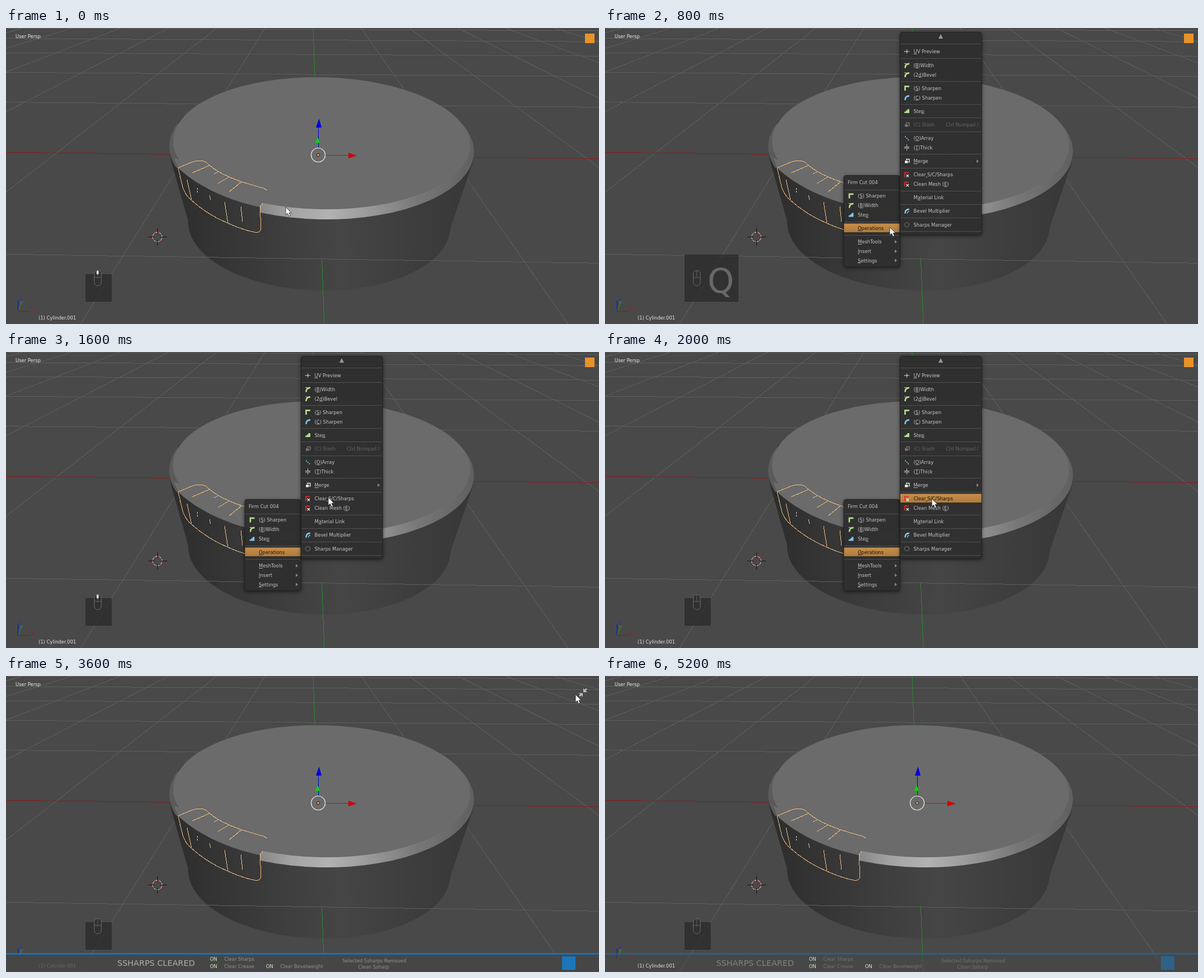
These frames come from a looping animation (1058 px wide and 529 px high, 5400 ms). An HTML page:

```html
<!DOCTYPE html>
<html lang="en">
<head>
<meta charset="utf-8">
<title>Clearing sharps on a cylinder</title>
<style>
html, body { margin: 0; width: 100%; height: 100%; overflow: hidden; background: #494949; }
svg { display: block; width: 1058px; height: 529px; }
text { font: 8.4px "DejaVu Sans", sans-serif; fill: #c6c6c6; white-space: pre; }
.u { text-decoration: underline; }
.dim { fill: #656565; }
.on { fill: #111; }
.sep { stroke: #505050; }
.menu { filter: drop-shadow(0 2px 3px rgba(0,0,0,.55)); }
.frame { fill: #303030; fill-opacity: .97; stroke: #222; }
.grid { stroke: #5e5e5e; shape-rendering: crispEdges; }
.orange { fill: none; stroke: #f3bc7d; shape-rendering: crispEdges; }
.foot text { fill: #929292; }
</style>
</head>
<body>
<svg viewBox="0 0 1058 529" xmlns="http://www.w3.org/2000/svg">
  <defs>
    <linearGradient id="side">
      <stop offset="0" stop-color="#2c2c2c"/><stop offset=".18" stop-color="#353535"/>
      <stop offset=".4" stop-color="#3f3f3f"/><stop offset=".56" stop-color="#454545"/>
      <stop offset=".78" stop-color="#3e3e3e"/><stop offset="1" stop-color="#373737"/>
    </linearGradient>
    <linearGradient id="ring" gradientUnits="userSpaceOnUse" x1="291" x2="835">
      <stop offset="0" stop-color="#5c5c5c"/><stop offset=".05" stop-color="#565656"/>
      <stop offset=".3" stop-color="#868686"/><stop offset=".4" stop-color="#a2a2a2"/>
      <stop offset=".53" stop-color="#b2b2b2"/><stop offset=".68" stop-color="#969696"/>
      <stop offset=".82" stop-color="#777"/><stop offset="1" stop-color="#606060"/>
    </linearGradient>
    <linearGradient id="glow" x2="0" y2="1">
      <stop offset="0" stop-color="#c68f4c"/><stop offset="1" stop-color="#b17a39"/>
    </linearGradient>
    <clipPath id="uncut"><path d="M280,80H307V250H280Z M453,80H850V360H453Z"/></clipPath>
  </defs>

  <rect width="1058" height="529" fill="#494949"/>
  <g id="far" class="grid"></g>

  <!-- cylinder -->
  <path fill="url(#side)" d="M291,211 Q293,236 298,250 L325,345 A234,118 1.4 0 0 793,357 L830,249 Q835,236 835,222 Z"/>
  <g transform="rotate(1.2 563 216)">
    <ellipse cx="563" cy="216" rx="272" ry="126" fill="url(#side)"/>
  </g>
  <g clip-path="url(#uncut)">
    <ellipse cx="563" cy="216" rx="272" ry="126" transform="rotate(1.2 563 216)" fill="url(#ring)"/>
  </g>
  <path d="M300,232 L307,250 C340,282 395,308 453,320 L458,313 L420,270Z" fill="#6b6b6b"/>
  <ellipse cx="563" cy="206" rx="265" ry="118" transform="rotate(1.1 563 206)" fill="#6b6b6b"/>
  <g id="near" class="grid"></g>

  <g class="orange">
    <path d="M307,250 L331,240 Q352,233 360,243 Q378,258 398,266 Q420,276 459,286 L466,290"/>
    <path d="M307,250 L316,287 Q322,301 331,308 Q360,334 396,349 Q423,361 444,365 Q455,367 455,356 L453,320 L458,313"/>
    <path d="M362,246L332,259 M398,266L378,278 M420,275L398,293 M323,271L331,307 M363,299L365,307 M390,311L396,349 M419,319L422,346"/>
    <path d="M341,286L342,294 M378,257L370,261" stroke="#ddd" stroke-dasharray="3 2"/>
  </g>

  <!-- transform handles -->
  <g fill="none">
    <path d="M557.500,214V178" stroke="#00d"/><path d="M553,178L558.500,162L563,178Z" fill="#00d"/>
    <path d="M556.500,214V205" stroke="#0c0"/><path d="M552,205L556,195L560,205Z" fill="#0d0"/>
    <path d="M570,227.500H611" stroke="#b31515"/><path d="M611,223L626,228L611,233Z" fill="#d00000"/>
    <circle cx="557" cy="227" r="12.500" stroke="#f2f2f2" stroke-width="1.200"/>
    <circle cx="557" cy="227" r="2.700" fill="#c39a68" stroke="#2a2016"/>
  </g>

  <!-- 3D cursor -->
  <g fill="none">
    <circle cx="270" cy="373.500" r="8.500" stroke="#f0f0f0"/>
    <circle cx="270" cy="373.500" r="8.500" stroke="#d01818" stroke-dasharray="3.340"/>
    <path d="M254,373.500H265M276,373.500H287M270.500,358V368M270.500,379V389" stroke="#111"/>
  </g>

  <g fill="none" stroke-width="1.300">
    <path d="M21.500,507V487" stroke="#1414c4"/><path d="M22,506L26,495" stroke="#208a20"/>
    <path d="M21,506.500H43" stroke="#a81212"/>
  </g>
  <text x="24" y="488" style="fill:#2a2ad0">z</text>
  <text x="25" y="493" style="fill:#24b024">y</text>
  <text x="45" y="506" style="fill:#b41818">x</text>

  <rect id="badge" x="1033" y="10" width="17" height="17" fill="#e8922a"/>
  <g id="restore" fill="#d5d5d5" stroke="#d5d5d5" stroke-width="2.500">
    <path d="M1031,28L1036,22.500" fill="none"/><path d="M1030,22L1037,29H1030Z" stroke="none"/>
    <path d="M1027,32L1023,36" fill="none"/><path d="M1022,30.500H1029V37.500Z" stroke="none"/>
  </g>

  <!-- pressed keys -->
  <rect id="panel" x="142.500" fill="#2a2a2a" fill-opacity=".75" stroke="#2c2c2c"/>
  <text id="key" x="183" y="473" style="font-size:60px">Q</text>
  <g fill="none" stroke="#6e6e6e">
    <rect x="157.500" y="433.500" width="12.500" height="27" rx="6" fill="#303030"/>
    <path d="M157.500,445Q163.700,448 170,445M163.700,434V446" stroke-width=".8"/>
    <ellipse id="wheel" cx="163.500" cy="437" rx="2" ry="3.500" fill="#e5e5e5" stroke="none"/>
  </g>

  <!-- status strip -->
  <rect id="cover" y="495" width="1058" height="34" fill="#464646"/>
  <text x="58" y="520.500" id="object" style="fill:#e4e4e4">(1) Cylinder.001</text>
  <g id="foot" class="foot">
    <rect y="495" width="1058" height="3" fill="#1d70ae"/>
    <text x="198.500" y="518" style="font-size:14.400px;fill:#aeaeae">SSHARPS CLEARED</text>
    <text x="389.500" y="509">Clear Sharps</text>
    <text x="389.500" y="522">Clear Crease</text>
    <text x="489.500" y="522">Clear Bevelweight</text>
    <text x="657" y="511.500" text-anchor="middle">Selected Ssharps Removed</text>
    <text x="656" y="522.500" text-anchor="middle">Clean Ssharp</text>
    <rect x="992" y="501" width="24" height="24" fill="#1c76b9"/>
  </g>
  <g id="marks">
    <text x="364" y="509" style="fill:#d2ebc6">ON</text>
    <text x="364" y="522" style="fill:#d2ebc6">ON</text>
    <text x="464" y="522" style="fill:#d2ebc6">ON</text>
  </g>
  <text x="17" y="17.500" style="fill:#ececec">User Persp</text>

  <g id="main" class="menu"></g>
  <g id="sub" class="menu"></g>
  <path id="pointer" d="M0,0V14L3.300,11.200L5.700,16.500L8.300,15.400L6,10.300H10.300Z" fill="#f6f6f6" stroke="#222" stroke-width=".8"/>
</svg>
<script>
const LOOP = 5400;
const $ = id => document.getElementById(id);

// Floor grid: rows approach the horizon as 1 / depth, columns meet on it.
const HORIZON = -130;
const line = (x1, y1, x2, y2, color) =>
  `<line x1="${x1}" y1="${y1}" x2="${x2}" y2="${y2}"${color ? ` stroke="${color}"` : ''}/>`;
function row(k, color) {
  const depth = 1 / (.002793 + k * .00095), y = HORIZON + depth;
  const slope = .0013 + depth * .0000255;
  return line(0, y - slope * 550, 1058, y + slope * 508, color);
}
function column(k, color, top = 0) {
  const slope = .0378 + .66 * k, x = y => 543 + (y - HORIZON) * slope;
  return line(x(top), top, x(529), 529, color);
}
const RED = '#8a1c1c', LIME = '#2b8a2b';
let far = '';
for (let k = 1; k <= 5; k++) far += row(k);
for (let k = 1; k <= 6; k++) far += column(k) + column(-k);
$('far').innerHTML = far + row(0, RED) + column(0, LIME);
$('near').innerHTML = row(-1) + column(0, LIME, 412);

// Menu icons, drawn around their centre.
const stroke = (d, color, width = 1.3) =>
  `<path d="${d}" fill="none" stroke="${color}" stroke-width="${width}"/>`;
const GREEN = '#b4e08c', BLUE = '#7fc4ea';
const corner = color => stroke('M-3.500,5V-3.500H5', color, 3);
const bend = color => stroke('M-3.500,5Q-3.500,-3.500 5,-3.500', color, 3);
const stairs = color => `<path d="M-5,4V1H-2V-1H1V-4H5V4Z" fill="${color}"/>`;
const squares = color =>
  `<path d="M-4,-1H2V4H-4Z" fill="${color}"/>` + stroke('M-1,-2V-4H5V2H3', color, 1.5);
const erase = stroke('M-4,5V-4H4', '#e22a2a', 2) + stroke('M-1,0L4,5M4,0L-1,5', '#eee', 1.4);
const dots = [-4, -1, 2].map(v =>
  `<rect x="${v}" y="${v}" width="2.200" height="2.200" fill="${BLUE}"/>`).join('');
const ICONS = {
  corner: corner(GREEN), arc: bend(BLUE), step: stairs(GREEN), blueStep: stairs(BLUE),
  bevel: bend(GREEN) + stroke('M-5,-4H-1', '#ddd', 1),
  multi: bend(BLUE) + stroke('M1,5Q1,1 5,1', BLUE, 1.5),
  slash: squares('#777'), merge: squares('#eee'), erase, dots,
  thick: stroke('M-5,-1H5M-5,1.500H5M0,-6V-2M0,6V3', '#ddd', 1.1),
  uv: stroke('M-5,0H5M0,-4V4', '#ddd', 1.6).replace('/>', ' stroke-dasharray="2 1"/>'),
  ring: '<circle r="4.500" fill="none" stroke="#999" stroke-width="1.300" stroke-dasharray="1.500 1.300"/>'
};

const label = s => s.replace(/_(.)/, '<tspan class="u">$1</tspan>');

function buildMenu(id, box, textX, rows, seps) {
  const [x, y, w, h] = box;
  let out = `<rect class="frame" x="${x}" y="${y}" width="${w}" height="${h}" rx="4"/>`;
  for (const s of seps) out += `<path class="sep" d="M${x + 1},${s}H${x + w - 1}"/>`;
  out += `<rect class="bar" x="${x + .5}" width="${w - 1}" height="15.500" fill="url(#glow)"/>`;
  for (const [cy, name, icon, arrow] of rows) {
    if (icon) out += `<g transform="translate(${textX - 12},${cy}) scale(.88)">${ICONS[icon]}</g>`;
    out += `<text x="${textX}" y="${cy + 3}" data-row="${cy}"${icon === 'slash' ? ' class="dim"' : ''}>${label(name)}</text>`;
    if (arrow) out += `<path d="M${x + w - 9},${cy - 3}L${x + w - 5},${cy}L${x + w - 9},${cy + 3}Z" fill="#888"/>`;
  }
  $(id).innerHTML = out;
}

buildMenu('main', [426, 263.5, 100, 163], 451, [
  [300, '(_S) Sharpen', 'corner'], [317, '(_B)Width', 'bevel'], [334, 'Ste_p', 'blueStep'],
  [358, '_Operations', '', 1], [382, '_MeshTools', '', 1], [399, '_Insert', '', 1], [415.5, '_Settings', '', 1]
], [289.5, 346.5, 370.5]);
$('main').insertAdjacentHTML('beforeend', '<text x="433" y="279">Firm Cut 004</text>');

buildMenu('sub', [526.5, 7.5, 145.5, 361.5], 550.5, [
  [42, '_UV Preview', 'uv'], [67, '(_B)Width', 'bevel'], [83.5, '(2_d)Bevel', 'bevel'],
  [107.5, '(_S) Sharpen', 'corner'], [124.5, '(_C) Sharpen', 'arc'], [148.5, 'Ste_p', 'step'],
  [173, '(C) Slash', 'slash'], [197, '(_O)Array', 'dots'], [213.5, '(_T)Thick', 'thick'],
  [238, '_Merge', 'merge', 1], [262, 'Clear_ S/C/Sharps', 'erase'], [279, 'Clean Mesh (_E)', 'erase'],
  [303, 'M_aterial Link'], [327, 'Bevel Multiplier', 'multi'], [351.5, 'Sharps Manager', 'ring']
], [28.5, 54.5, 95.5, 136.5, 160.5, 185.5, 225.5, 250.5, 291.5, 315.5, 339.5, 363.5]);
$('sub').insertAdjacentHTML('beforeend',
  '<path d="M595,19L599,11L603,19Z" fill="#999"/><text class="dim" x="608" y="176">Ctrl Numpad /</text>');

// Held values: [time, value] pairs.
const at = (track, t) => track.reduce((held, [from, value]) => t >= from ? value : held, track[0][1]);

const POINTER = [
  [0, [499, 320]], [200, [507, 316]], [600, [507, 356]], [800, [508, 356]], [1000, [508, 357]],
  [1200, [558, 292]], [1400, [566, 276]], [1600, [575, 260]], [1800, [581, 254]], [2000, [583, 262]],
  [2600, [579, 263]], [2800, [513, 275]], [3000, [905, 123]], [3200, [974, 42]], [3400, [1034, 24]],
  [3600, [1016, 33]], [3800, [321, 449]], [4000, [149, 513]], [4200, [32, 513]], [4400, [-50, 0]]
];
const KEY = [[0, 0], [400, '#a0a0a0'], [600, '#8a8a8a'], [800, '#686868'], [1000, '#454545'], [1200, '#232323'], [1400, 0]];
const WHEEL = [[0, 1], [400, 0], [1600, 1], [1800, 0]];
const MAIN_ROW = [[0, 317], [600, 358]];
const SUB_ROW = [[0, 0], [1200, 303], [1400, 279], [1600, 0], [1800, 262]];
const FOOT = [[0, 0], [2600, 1], [4600, .95], [4800, .85], [5000, .72], [5200, .58]];
const OBJECT = [[0, 1], [2600, .2], [4600, .4], [4800, .6], [5000, .8], [5200, 1]];
const RESTORE = [[0, 0], [3200, .35], [3400, .85], [3600, .8], [3800, 0]];

const show = (id, on) => $(id).setAttribute('opacity', +on);
function highlight(id, cy) {
  const bar = $(id).querySelector('.bar');
  bar.setAttribute('opacity', cy ? 1 : 0);
  bar.setAttribute('y', cy - 8.5);
  for (const el of $(id).querySelectorAll('[data-row]')) el.classList.toggle('on', +el.dataset.row === cy);
}

function draw(now) {
  const t = now % LOOP;
  const [x, y] = at(POINTER, t), key = at(KEY, t), foot = at(FOOT, t);
  $('pointer').setAttribute('transform', `translate(${x},${y})`);
  $('panel').setAttribute('y', key ? 405.5 : 440.5);
  $('panel').setAttribute('width', key ? 95 : 45.5);
  $('panel').setAttribute('height', key ? 83 : 48);
  show('key', !!key);
  $('key').style.fill = key || '#222';
  show('wheel', at(WHEEL, t));
  show('main', t >= 400 && t < 2600);
  show('sub', t >= 800 && t < 2600);
  highlight('main', at(MAIN_ROW, t));
  highlight('sub', at(SUB_ROW, t));
  show('badge', t < 2600);
  show('restore', at(RESTORE, t));
  show('foot', foot);
  show('cover', foot * .85);
  show('marks', t >= 2600);
  show('object', at(OBJECT, t));
}

const start = performance.now();
function tick() {
  draw(performance.now() - start);
  requestAnimationFrame(tick);
}
tick();
</script>
</body>
</html>
```
